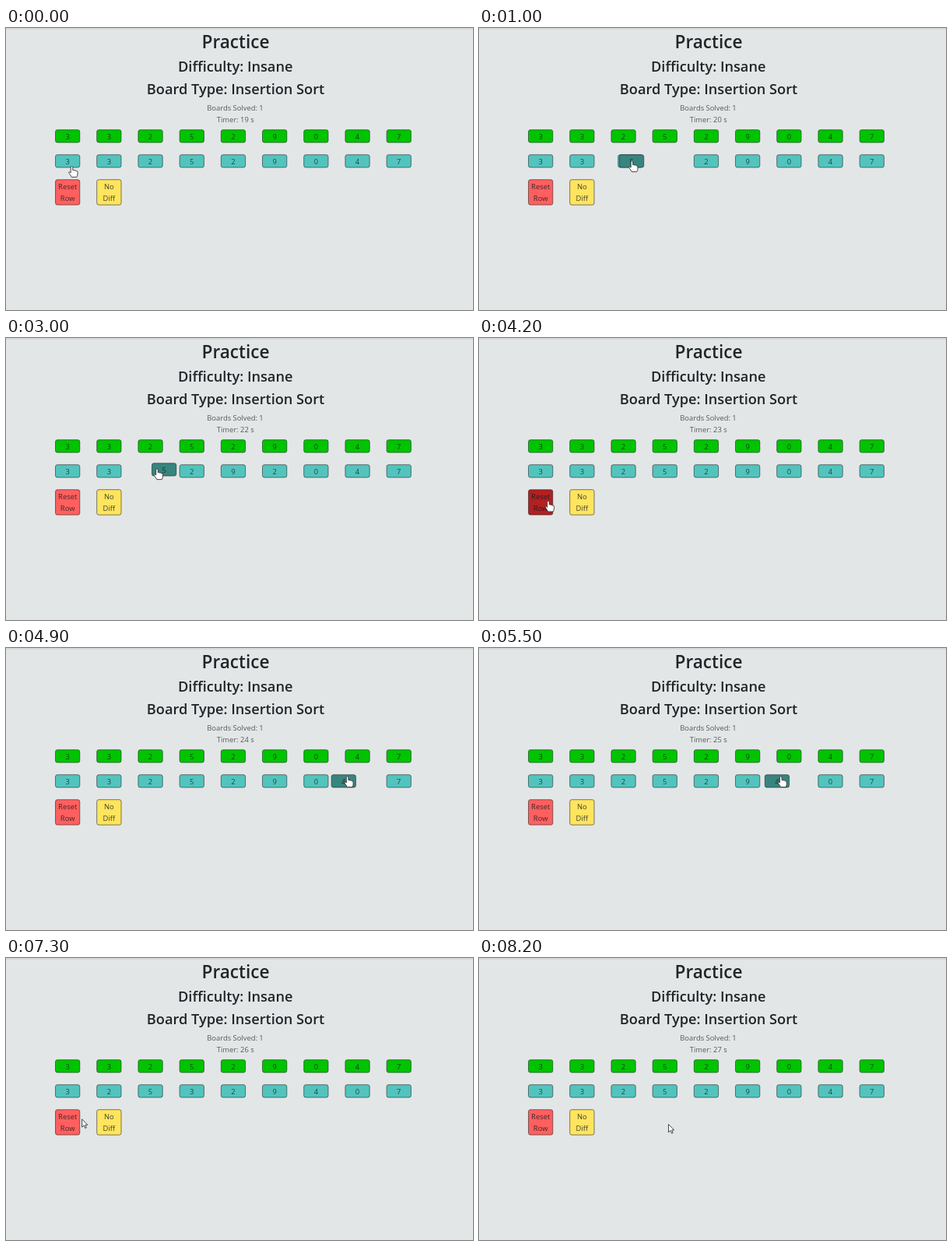
These frames come from a looping animation (600 by 362 pixels, 8.3 s). An HTML page with a canvas:

```html
<!DOCTYPE html>
<html lang="en">
<head>
<meta charset="utf-8">
<title>Insertion Sort Practice</title>
<style>
html, body { margin: 0; width: 100%; height: 100%; overflow: hidden; background: #e3e6e7; }
canvas { display: block; width: 600px; height: 362px; }
</style>
</head>
<body>
<canvas id="stage" width="600" height="362"></canvas>
<script>
const ctx = document.getElementById('stage').getContext('2d');
const LOOP = 8300, STEP = 100, SLIDE = 400, PRESS = 400;
const DIGITS = [...'332529047'];
const LEFT = 63.5, PITCH = 53.2, TILE_W = 31.3, TILE_H = 16.3;
const GOAL_Y = 130.7, ROW_Y = 162.7, BUTTON_Y = 194.7, BUTTON_H = 32.4;
const FONT = '"Open Sans", "Noto Sans", sans-serif';
const SWAP_AT = 0.6;      // share of a drag after which the row reorders
const SWAP_TIME = 0.567;  // moment at which smooth() reaches that share

const slotX = i => LEFT + PITCH * i;
const lerp = (a, b, u) => a + (b - a) * u;
const smooth = u => { u = Math.min(1, Math.max(0, u)); return u * u * (3 - 2 * u); };

// Every action owns the pointer from start to end; travel between them is eased.
const rest = (start, end, x, y) => ({ start, end, pointer: () => [x, y] });
const reset = (start, end) => ({ ...rest(start, end, 89, 209), resets: true });

// grip: pointer position inside the tile; slide: direction neighbours come from
function drag(start, end, from, to, grip, sway = 0, slide = 1) {
  const tile = t => {
    const u = Math.min(1, (t - start) / (end - start));
    return [slotX(lerp(from, to, smooth(u))), ROW_Y + sway * Math.sin(Math.PI * u)];
  };
  const pointer = t => tile(t).map((v, axis) => v + grip[axis]);
  return { start, end, from, to: Math.round(to), slide, tile, pointer };
}

const ACTIONS = [
  rest(0, 0, 84.5, 177.5),
  drag(500, 1200, 3, 2, [16, 8]),
  drag(1400, 2285, 5, 4, [14.5, 4.5], 1.8),
  drag(2750, 3400, 2, 3, [6.5, 7], -2.1),
  reset(3900, 4350),
  drag(4600, 5500, 7, 5.71, [20.5, 2]),
  drag(6450, 6700, 0, 3, [22, 8], 0, -1),
  reset(7400, 8100),
  rest(8200, LOOP, 243.5, 213.5)
];

// The row's successive orders follow from the actions.
const sorted = DIGITS.map((_, id) => id);
const ORDERS = [{ time: 0, order: sorted, slide: 0 }];
for (const action of ACTIONS) {
  const { start, end, resets, tile, from, to, slide } = action;
  if (resets) ORDERS.push({ time: start + 100, order: sorted, slide: 0 });
  if (!tile) continue;
  const order = [...ORDERS[ORDERS.length - 1].order];
  [action.id] = order.splice(from, 1);
  order.splice(to, 0, action.id);
  ORDERS.push({ time: lerp(start, end, SWAP_TIME), order, slide });
}

function pointerAt(t) {
  const i = ACTIONS.findIndex(a => t <= a.end);
  const next = ACTIONS[i];
  if (t >= next.start) return next.pointer(t);
  const last = ACTIONS[i - 1];
  const a = last.pointer(last.end), b = next.pointer(next.start);
  const u = smooth((t - last.end) / (next.start - last.end));
  return [lerp(a[0], b[0], u), lerp(a[1], b[1], u)];
}

function slotAt(id, t) {
  const slotIn = i => ORDERS[i].order.indexOf(id);
  let i = ORDERS.length - 1;
  while (ORDERS[i].time > t) i--;
  const slot = slotIn(i);
  while (i > 0 && slotIn(i - 1) === slot) i--;
  if (i === 0) return slot;
  const { time, slide } = ORDERS[i];
  const shift = (slotIn(i - 1) - slot) * slide;
  return Math.max(0, slot + shift * (1 - smooth((t - time) / SLIDE)));
}

function tileState(id, t) {
  const x = slotX(slotAt(id, t));
  const move = ACTIONS.find(a => a.id === id && t >= a.start && t < a.end + SLIDE);
  if (!move) return { id, x, y: ROW_Y, held: false, lifted: 0 };
  const [fromX, fromY] = move.tile(t);
  const u = smooth((t - move.end) / SLIDE);
  return { id, x: lerp(fromX, x, u), y: lerp(fromY, ROW_Y, u), held: t <= move.end, lifted: 1 };
}

function text(str, x, y, size, color, weight = 400) {
  ctx.font = `${weight} ${size}px ${FONT}`;
  ctx.fillStyle = color;
  ctx.textAlign = 'center';
  ctx.fillText(str, x, y);
}

function box(x, y, h, fill) {
  ctx.beginPath();
  ctx.roundRect(x, y, TILE_W, h, 2.5);
  ctx.fillStyle = fill;
  ctx.fill();
  ctx.strokeStyle = 'rgba(20,30,30,.7)';
  ctx.lineWidth = 0.8;
  ctx.stroke();
}

function tile(digit, x, y, fill) {
  box(x, y, TILE_H, fill);
  text(digit, x + TILE_W / 2, y + 11.8, 9.4, 'rgba(20,28,32,.76)');
}

function button(x, fill, lines) {
  box(x, BUTTON_Y, BUTTON_H, fill);
  lines.forEach((line, i) => text(line, x + TILE_W / 2, 207 + 15 * i, 9.4, 'rgba(20,24,28,.8)'));
}

const HAND = new Path2D('M-1.3 .9Q0-.7 1.3 .9V5Q2.5 4.2 3.5 5.4Q4.8 4.7 5.6 6Q7.4 5.5 7.5 7.4V10.5Q7.3 12 6.3 13.9H-.2Q-1.8 11-3.5 8.9Q-4.2 7.3-2.7 7.1L-1.3 8.3Z');
const ARROW = new Path2D('M0 0V10.2L2.5 8L4.1 11.6L5.7 10.9L4.2 7.4H7.2Z');

function drawPointer(x, y, shape) {
  ctx.save();
  ctx.translate(x, y);
  ctx.fillStyle = '#fff';
  ctx.fill(shape);
  ctx.strokeStyle = '#333';
  ctx.lineWidth = 0.9;
  ctx.lineJoin = 'round';
  ctx.stroke(shape);
  ctx.restore();
}

function isClickable(x, y) {
  const column = (x - LEFT) / PITCH;
  if (column < 0 || column % 1 > TILE_W / PITCH) return false;
  const within = (top, height, count) => y >= top && y <= top + height && column < count;
  return within(ROW_Y, TILE_H, DIGITS.length) || within(BUTTON_Y, BUTTON_H, 2);
}

function draw(t) {
  ctx.fillStyle = '#e3e6e7';
  ctx.fillRect(0, 0, 600, 362);
  ctx.fillStyle = '#d5d7d8';
  ctx.fillRect(0, 0, 600, 2);

  text('Practice', 295, 26, 22.6, '#212529', 600);
  text('Difficulty: Insane', 294.7, 56, 18.2, '#212529', 600);
  text('Board Type: Insertion Sort', 295, 85, 18.2, '#212529', 600);
  text('Boards Solved: 1', 294.5, 105.7, 9.4, '#55595c');
  text(`Timer: ${19 + Math.floor((t + 650) / 1000)} s`, 294.7, 120.7, 9.4, '#55595c');

  DIGITS.forEach((digit, i) => tile(digit, slotX(i), GOAL_Y, '#00c400'));

  const pressed = ACTIONS.some(a => a.resets && t >= a.start && t < a.start + PRESS);
  button(slotX(0), pressed ? '#b22022' : '#ff5f5f', ['Reset', 'Row']);
  button(slotX(1), '#ffe45e', ['No', 'Diff']);

  const tiles = sorted.map(id => tileState(id, t));
  tiles.sort((a, b) => a.lifted - b.lifted || a.x - b.x);
  for (const { id, x, y, held } of tiles) tile(DIGITS[id], x, y, held ? '#38847f' : '#52c4bd');

  const [x, y] = pointerAt(t);
  const grabbing = tiles.some(s => s.held);
  drawPointer(x, y, grabbing || isClickable(x, y) ? HAND : ARROW);
}

function frame() {
  const t = performance.now() % LOOP;
  draw(Math.floor(t / STEP) * STEP);
  requestAnimationFrame(frame);
}
frame();
</script>
</body>
</html>
```
